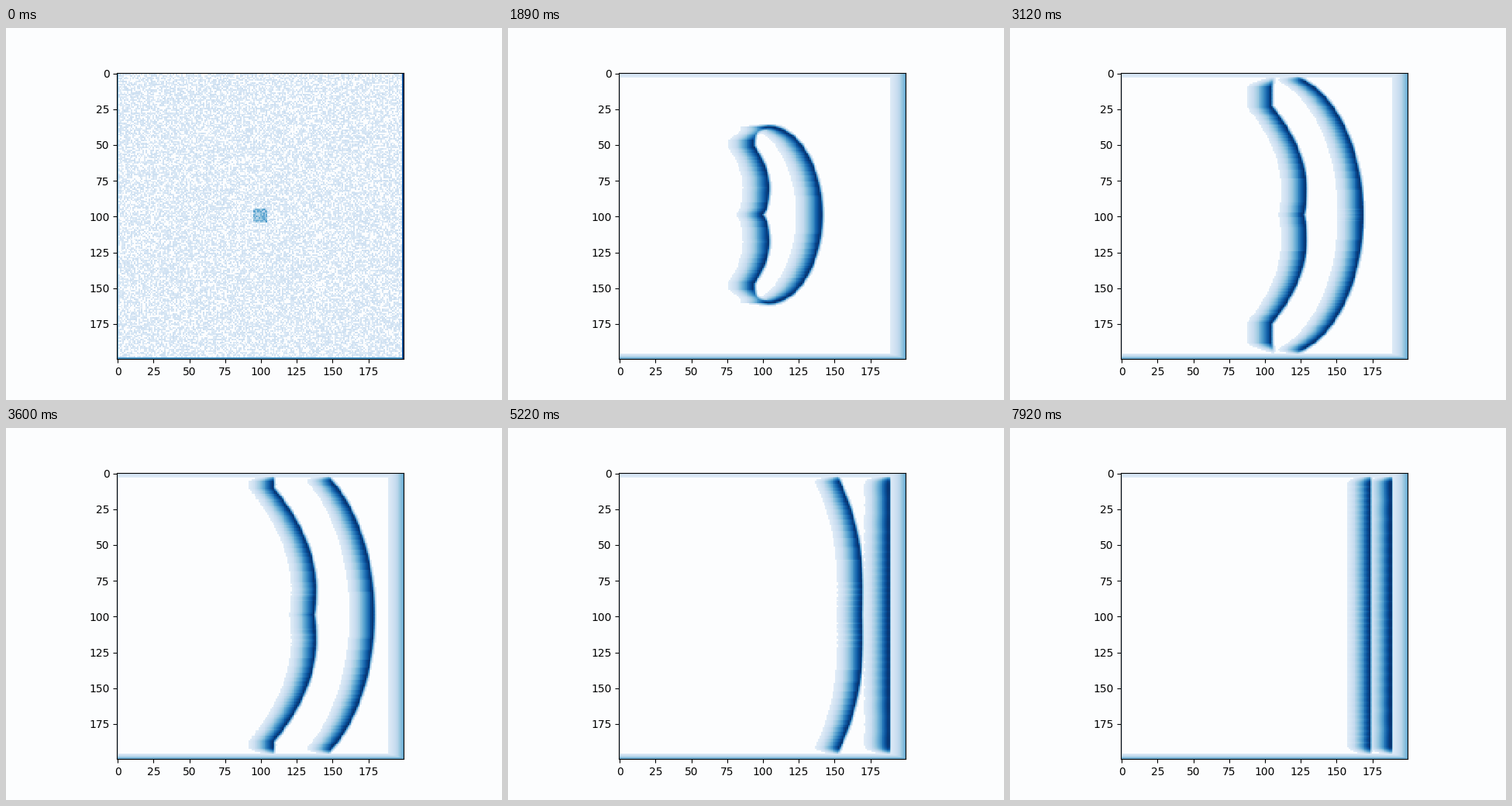
A matplotlib script that plays this animation: 640 px wide and 480 px high, repeating every 8 s.

```python
import numpy as np
import matplotlib.pyplot as plt
from matplotlib.animation import FuncAnimation
from matplotlib.colors import ListedColormap, to_rgba

SIZE = 200
FRAMES, INTERVAL = 250, 32
PAPER = "#fcfdfe"
WALL = 95            # waves end this far from the middle row
CORE = 1.7           # from a wave's sharp edge back to its centre line

plt.rcParams["font.family"] = "DejaVu Sans"
cells = np.arange(SIZE, dtype=np.float32)
half_y = np.arange(101, dtype=np.float32)
mirror = np.abs(np.arange(SIZE) - 99)

rng = np.random.default_rng(4)
noise = rng.uniform(0.04, 0.22, (SIZE, SIZE))
patch = np.zeros((SIZE, SIZE))
patch[95:105, 95:105] = rng.uniform(0.25, 0.6, (10, 10))


def soft_min(x, limit, width):
    return -width * np.logaddexp(-x / width, -limit / width)


def leading_wave(t):
    """A growing quarter ellipse that comes to rest near the right wall."""
    width, reach = 5 + 17.5 * t, 6 + 30 * t - CORE
    angle = np.linspace(0, np.arcsin(min(1, WALL / reach)), 180)
    top = np.array([100.5 + 22.3 * t - width, reach])
    x = top[0] + (width - CORE) * np.cos(angle)
    return soft_min(x, 189.7 - CORE, 2), reach * np.sin(angle), top


def trailing_wave(t):
    """A bulge with a fading notch; it closes in the middle, then slows down."""
    reach = 6 + 30 * t
    tip = min(max(0.78 * reach, reach - 13), WALL)
    gap = 14 * np.sin(np.pi * t / 1.5) if t < 1.5 else 0
    y = np.linspace(min(gap, tip), tip, 120)
    front = 3 * np.logaddexp(93 / 3, (68.2 + 20 * t) / 3)
    bulge = 0.0245 * np.exp(-0.4 * t) * np.maximum(y - 17, 0) ** 2
    notch = min(5, 22.7 * np.exp(-0.8 * t)) * np.exp(-y / 6)
    x = front - np.minimum(bulge, max(0, 11 * t - 10)) - notch
    return soft_min(x, 174.8, 4) - CORE, y


def wave_points(t):
    """Centre lines in the lower half: x, distance to the middle, weakness."""
    lead_x, lead_y, top = leading_wave(t)
    trail_x, trail_y = trailing_wave(t)

    # A rounded tip joins the two waves until it leaves through the wall.
    s = np.linspace(0, 1, 30)
    end = np.array([trail_x[-1], trail_y[-1]])
    corner = np.array([end[0], top[1]])
    tip = (np.outer((1 - s) ** 2, top) + np.outer(2 * s * (1 - s), corner)
           + np.outer(s ** 2, end))

    x = np.concatenate([lead_x, trail_x, tip[:, 0]])
    y = np.concatenate([lead_y, trail_y, tip[:, 1]])
    weak = 1.2 * np.clip((y - WALL + 4) / 4, 0, 1) ** 2
    weak[-len(s):] += 1.2 * np.sin(np.pi * s)
    inside = y <= WALL + 0.01
    return [v[inside].astype(np.float32) for v in (x, y, weak)]


def wave_age(t):
    """Recovery age of each cell: 0 in a wave, growing in the wake to its left."""
    x, y, weak = wave_points(t)
    dx2 = (cells[:, None] + 0.5 - x) ** 2 + weak ** 2
    dy2 = (half_y[:, None] - y) ** 2
    dist = np.sqrt(np.min(dy2[:, None, :] + dx2[None], axis=2))
    drift = cells * (1 + 0.02 * t)
    age = 8 * np.maximum(dist - 0.5, 0) + drift
    swept = np.minimum.accumulate(age[:, ::-1], axis=1)[:, ::-1]
    return (swept - drift)[mirror]


def wall_age():
    """Recovery age next to the four walls, which drain the field."""
    near = cells + 0.5
    far = SIZE - near
    across = np.minimum(10 + 8 * near, 7 + far)
    down = np.minimum(13 + 1.3 * near, 6 + 3.3 * far)
    return np.minimum(across[None, :], down[:, None])


def start_field():
    field = np.maximum(noise, patch)
    field[:, 0] = 0.5
    field[-1] = 0.6
    field[:, -1] = 0.88
    return field


def state(step):
    if step == 0:
        return start_field()
    age = np.minimum(wave_age(step * INTERVAL / 1000), walls)
    age = age + 2 * max(0, 8 - step)
    field = 0.97 * np.exp(-(age / 10) ** 1.3)
    haze = 0.13 + (noise - 0.13) * np.exp(-step / 1.5)
    settling = np.maximum(haze, patch) * np.exp(-step / 10)
    return np.maximum(field, settling)


walls = wall_age()
colors = plt.get_cmap("Blues")(np.linspace(0, 1, 256))
colors[:29] = to_rgba(PAPER)

fig, ax = plt.subplots(figsize=(6.4, 4.8), dpi=100, facecolor=PAPER)
image = ax.imshow(state(0), cmap=ListedColormap(colors), vmin=0, vmax=1,
                  interpolation="nearest")


def update(step):
    image.set_data(state(step))
    return (image,)


anim = FuncAnimation(fig, update, frames=FRAMES, interval=INTERVAL,
                     repeat=True, repeat_delay=0)
plt.show()
```
